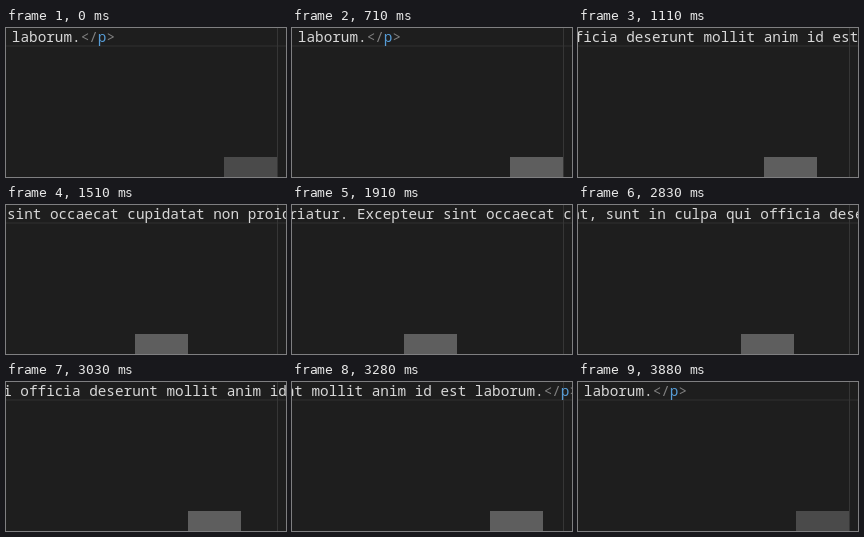
These frames come from a looping animation (280x149 px, 4100 ms). An HTML page:

```html
<!DOCTYPE html>
<html lang="en">
<head>
<meta charset="utf-8">
<title>Horizontal scrolling</title>
<style>
  html, body { margin: 0; width: 100%; height: 100%; overflow: hidden; background: #1e1e1e; }
  #editor { position: relative; width: 280px; height: 149px; overflow: hidden; background: #1e1e1e; }
  #editor > * { position: absolute; }
  #line { left: 0; top: 17px; width: 280px; height: 2px; background: #272727; }
  #ruler { left: 271px; top: 0; width: 1px; height: 149px; background: #363636; }
  #text {
    left: 0; top: 0; white-space: pre; color: #d8d8d8;
    font: 500 14.333px/18px "Noto Sans Mono", "DejaVu Sans Mono", monospace;
    font-variant-ligatures: none;
  }
  #text i { font-style: normal; color: #808080; }
  #text b { font-weight: inherit; color: #569cd6; }
  #thumb { left: 0; top: 129px; width: 53px; height: 20px; background: #4a4a4a; }
  #thumb.active { background: #5e5e5e; }
</style>
</head>
<body>
<div id="editor">
  <div id="line"></div>
  <div id="ruler"></div>
  <div id="text">pariatur. Excepteur sint occaecat cupidatat non proident, sunt in culpa qui officia deserunt mollit anim id est laborum.<i>&lt;/</i><b>p</b><i>&gt;</i></div>
  <div id="thumb"></div>
</div>
<script>
  const LOOP = 4100, PRESS = 710, RELEASE = 3880;
  const END = 218, END_SCROLL = 957, RATIO = 8.83;

  // Each drag: start time, then one thumb position per 100 ms.
  const drags = [
    [1010, 205, 186, 168, 153, 140, 129],
    [1610, 122, 117, 114, 112],
    [2330, 115, 120, 128, 138, 150, 163],
    [2930, 173, 182],
    [3180, 190, 198, 209, END]
  ];

  const text = document.getElementById('text');
  const thumb = document.getElementById('thumb');

  function thumbAt(t) {
    let x = END;
    for (const [start, ...steps] of drags) {
      if (t < start) break;
      x = steps[Math.min(steps.length - 1, Math.floor((t - start) / 100))];
    }
    return x;
  }

  function draw() {
    const t = performance.now() % LOOP;
    const x = thumbAt(t);
    const scroll = Math.round(END_SCROLL - (END - x) * RATIO);
    thumb.style.transform = `translateX(${x}px)`;
    thumb.classList.toggle('active', t >= PRESS && t < RELEASE);
    text.style.transform = `translateX(${-scroll}px)`;
    requestAnimationFrame(draw);
  }
  draw();
</script>
</body>
</html>
```
